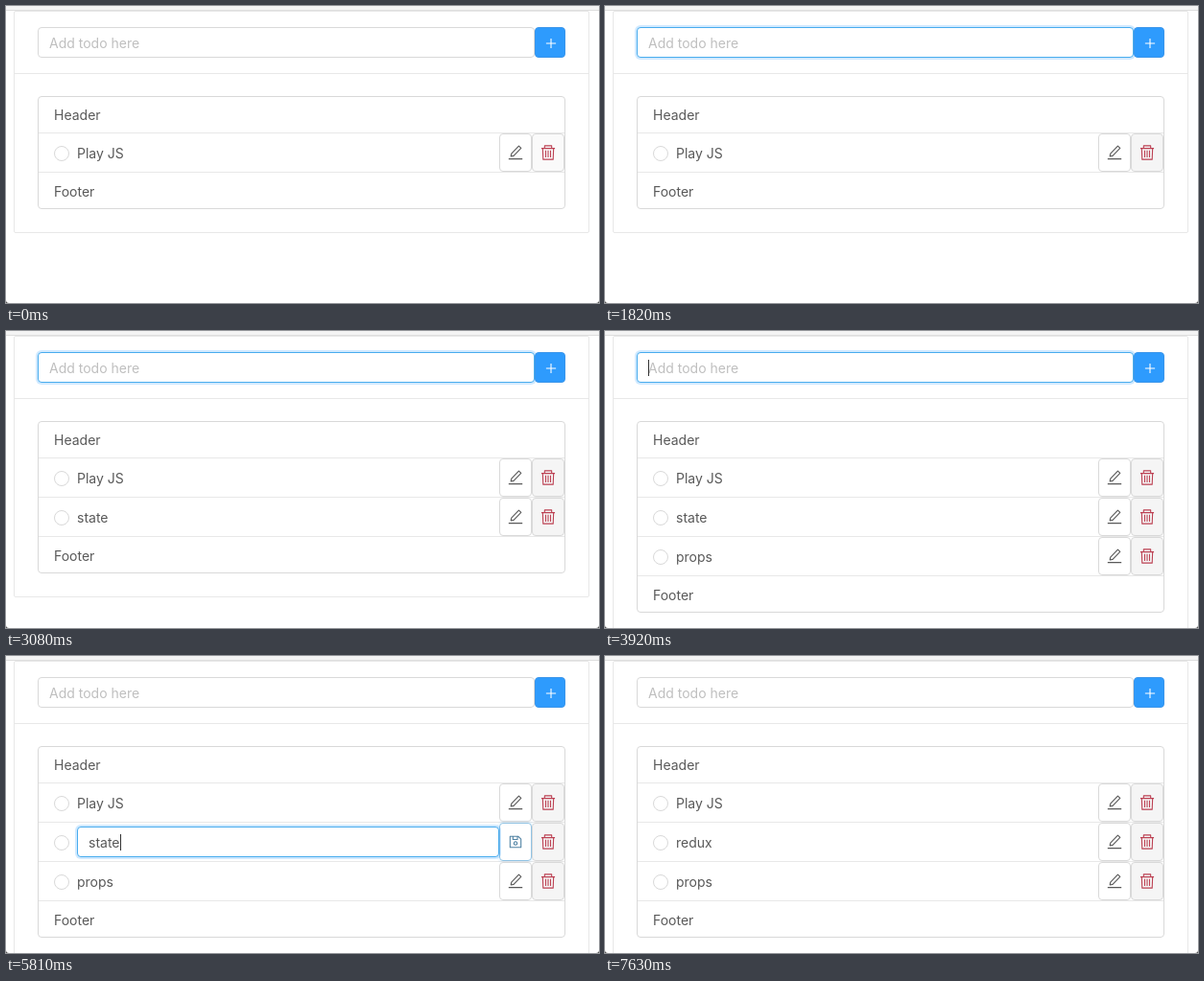
Write an HTML page that moves like this. It is 618 px wide and 310 px high and loops after 8 s.

```html
<!DOCTYPE html>
<html lang="en">
<head>
<meta charset="utf-8">
<title>Todo list</title>
<style>
  html, body { margin: 0; width: 100%; height: 100%; overflow: hidden; background: #444; }
  #stage { position: relative; width: 618px; height: 310px; overflow: hidden; background: #fff;
    border-radius: 0 0 3px 3px; color: #595959; font: 14px/17px Inter, "Open Sans", sans-serif; }
  #stage div, #stage svg { position: absolute; box-sizing: border-box; }
  .strip { width: 618px; height: 5px; background: #f4f4f4; border-bottom: 1px solid #dedede; }
  #card { left: 8px; top: 5px; width: 600px; border: 1px solid #e8e8e8; border-radius: 2px; }
  .rule { height: 1px; background: #e8e8e8; }
  .field { height: 32px; background: #fff; border: 1px solid #d9d9d9; border-radius: 4px; }
  .text { white-space: pre; }
  .field .text { left: 11px; top: 7px; }
  .text i { position: absolute; top: 0; width: 1px; height: 17px; background: #333; }
  .text em { font-style: normal; color: #bfbfbf; }
  .add { left: 551px; top: 22px; width: 32px; height: 32px; border: 1px solid #3a95ea; border-radius: 4px;
    background: #2e9bfd; color: #fff; }
  #list { left: 33px; top: 94px; width: 550px; border: 1px solid #d9d9d9; border-radius: 4px; }
  .row { left: 34px; width: 548px; height: 41px; }
  .radio { left: 16px; top: 13px; width: 16px; height: 16px; border: 1px solid #d9d9d9; border-radius: 50%; }
  .btn { top: 0; width: 34px; height: 40px; border: 1px solid #d9d9d9; border-radius: 4px; background: #fff; }
  .edit { left: 480px; }
  .del { left: 514px; color: #bc4052; }
  svg { left: 6px; top: 9px; width: 20px; height: 20px; fill: none; stroke: currentColor; stroke-width: 56; stroke-linejoin: round; }
  svg.plus { left: 5.5px; top: 5.5px; }
  svg.save { left: 8px; top: 11px; width: 16px; height: 16px; stroke-width: 70; }
</style>
</head>
<body>
<div id="stage">
  <div class="strip"></div>
  <div id="card"></div>
  <div class="rule" style="left:9px;top:70px;width:598px"></div>
  <div class="field" id="main" style="left:33px;top:22px;width:518px">
    <div class="text"><span></span><i></i><em>Add todo here</em></div>
  </div>
  <div class="add"><svg class="plus" viewBox="0 0 1024 1024"><path d="M512 250V774M250 512H774"/></svg></div>
  <div id="list"></div>
  <div class="text" style="left:50px;top:105px">Header</div>
  <div class="rule" style="left:34px;top:132px;width:548px"></div>
  <div class="text" id="footer" style="left:50px">Footer</div>
</div>
<script>
const LOOP = 8000, STEP = 70;
const GREY = [217, 217, 217], INK = [89, 89, 89], SKY = [72, 172, 238], PRESS = [58, 112, 172];
const $ = (sel, root = document) => root.querySelector(sel);
const icon = (name, d) => `<svg class="${name}" viewBox="0 0 1024 1024"><path d="${d}"/></svg>`;
const PEN = icon('pen', 'M266 714L294 565L688 160L808 280L414 685ZM144 850H880');
const SAVE = icon('save', 'M148 148H700L876 324V876H148ZM340 148V350H640V148M512 500a110 110 0 1 0 1 0Z');
const BIN = icon('bin', 'M150 290H874M322 290L324 148H700L702 290M222 290L245 876H779L802 290M384 400V770M512 400V770M640 400V770');

const rows = ['Play JS', 'state', 'props'].map((label, i) => {
  const row = document.createElement('div');
  row.className = 'row';
  row.style.top = 133 + 41 * i + 'px';
  row.innerHTML = `<div class="rule" style="top:40px;width:548px"></div><div class="radio"></div>
    <div class="text label" style="left:40px;top:12px">${label}</div>
    <div class="btn edit">${PEN}</div><div class="btn del">${BIN}</div>`;
  $('#stage').append(row);
  return row;
});
const item = rows[1], button = $('.edit', item), label = $('.label', item);
button.innerHTML += SAVE;
const editor = document.createElement('div');
editor.className = 'field';
editor.style.cssText = 'left:40px;top:4px;width:440px';
editor.innerHTML = '<div class="text"><span></span><i></i></div>';
item.append(editor);

const within = (t, a, b) => t >= a && t < b;
const ramp = (t, a, b) => {
  const p = Math.min(1, Math.max(0, (t - a) / (b - a)));
  return p * p * (3 - 2 * p);
};
const mix = (a, b, p) => a.map((v, i) => v + (b[i] - v) * p);
const rgb = c => `rgb(${c.map(Math.round)})`;
const show = (el, on) => el.style.display = on ? '' : 'none';
// The part of the word whose keystrokes are already made
const typed = (word, times, t) => word.slice(0, times.filter(k => t >= k).length);

function drawField(el, value, caret, border, glow) {
  $('span', el).textContent = value;
  show($('i', el), caret);
  el.style.borderColor = rgb(mix(GREY, SKY, border));
  el.style.boxShadow = `0 0 0 2px rgba(24,144,255,${.2 * glow})`;
}

function render(t) {
  const count = 1 + (t >= 2590) + (t >= 3920);
  const editing = within(t, 5600, 7630);

  const value = t < 2590 ? typed('state', [1960, 2030, 2100, 2240, 2310], t)
    : t < 3920 ? typed('props', [3150, 3290, 3360, 3500, 3570], t) : '';
  const caret = within(t, 1330, 1820) || within(t, 1960, 3080) ||
    within(t, 3150, 4480) || within(t, 4970, 5320);
  const borderOut = 1 - ramp(t, 5320, 5620), glowOut = 1 - ramp(t, 5250, 5530);
  drawField($('#main'), value, caret, ramp(t, 1050, 1350) * borderOut, ramp(t, 1190, 1470) * glowOut);
  show($('em'), !value);

  rows.forEach((row, i) => {
    show(row, i < count);
    $('.del', row).style.background = t < 140 ? '#fafafa' : '#f5f5f5';
  });
  $('#list').style.height = 77 + 41 * count + 'px';
  $('#card').style.height = 191 + 41 * count + 'px';
  $('#footer').style.top = 144 + 41 * count + 'px';

  // Hover, press and release of the edit button
  const hover = ramp(t, 5180, 5400) * (1 - ramp(t, 5670, 5950));
  const press = ramp(t, 5380, 5450) * (1 - ramp(t, 5530, 5660));
  const tint = base => rgb(mix(mix(base, SKY, hover), PRESS, press));
  button.style.borderColor = tint(GREY);
  button.style.color = tint(INK);
  const wave = within(t, 5600, 5950) ? ramp(t, 5500, 5950) : 0;
  button.style.boxShadow = `0 0 0 ${3 * wave}px rgba(24,144,255,${wave && .2 * (1 - wave)})`;

  show($('.pen', item), !editing);
  show($('.save', item), editing);
  show(label, !editing);
  label.textContent = t < 7630 ? 'state' : 'redux';
  show(editor, editing);
  const text = t < 6650 ? 'state' : typed('redux', [6650, 6720, 6930, 7070, 7140], t);
  drawField(editor, text, t < 6090 || t >= 6650, 1, 1);
  const selected = within(t, 6580, 6650);
  $('span', editor).style.cssText = selected ? 'background:#4896e8;color:#fff' : '';
}

function frame(now) {
  render(Math.floor(now % LOOP / STEP) * STEP);
  requestAnimationFrame(frame);
}
frame(performance.now());
</script>
</body>
</html>
```
